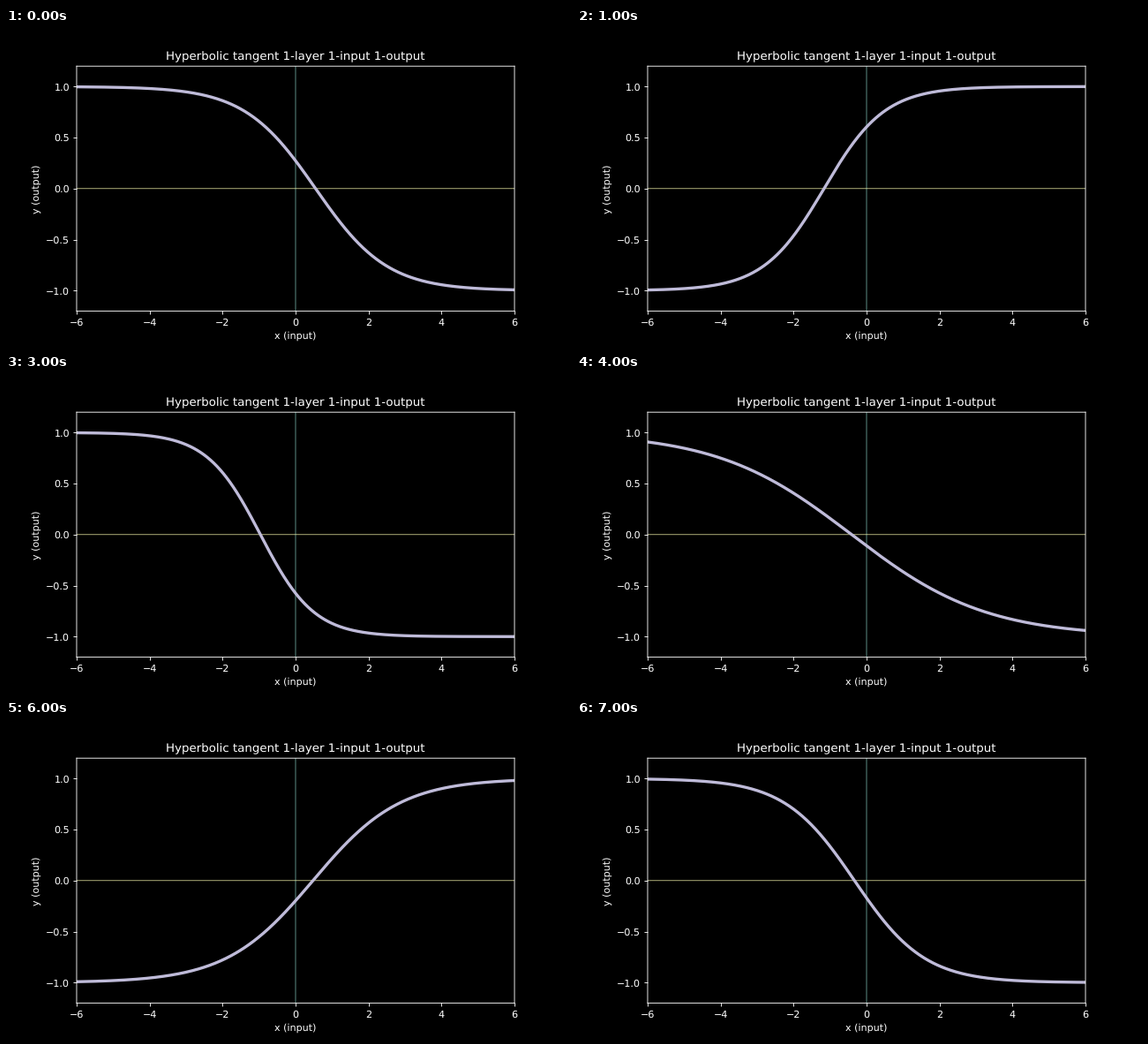
These frames come from a looping animation (640 by 360 pixels, 8000 ms). A matplotlib script:

```python
import numpy as np
import matplotlib.pyplot as plt
from matplotlib.animation import FuncAnimation

plt.style.use("dark_background")
# Soft, unsnapped edges and natural letter spacing
plt.rcParams.update({"path.snap": False, "text.hinting": "none"})

# One key point per second: input weight and bias of the neuron
weights = [-0.51, 0.6, -0.158, -0.68, -0.271, 0.573, 0.42, -0.52]
biases = [0.28, 0.7, -0.466, -0.655, -0.111, -0.984, -0.2, -0.172]

x = np.linspace(-6, 6, 400)

fig, ax = plt.subplots(figsize=(8, 4.5), dpi=80)
ax.set(xlim=(-6, 6), ylim=(-1.2, 1.2))
ax.set_title("Hyperbolic tangent 1-layer 1-input 1-output", pad=6.6)
ax.set_xlabel("x (input)")
ax.set_ylabel("y (output)", labelpad=5)
ax.axvline(0, color="C0", lw=0.6, snap=True)
ax.axhline(0, color="C1", lw=0.6, snap=True)
curve, = ax.plot([], [], color="C2", lw=3)


def update(second):
    curve.set_data(x, np.tanh(weights[second] * x + biases[second]))
    return curve,


anim = FuncAnimation(fig, update, frames=len(weights), interval=1000,
                     repeat=True, repeat_delay=0)
plt.show()
```
